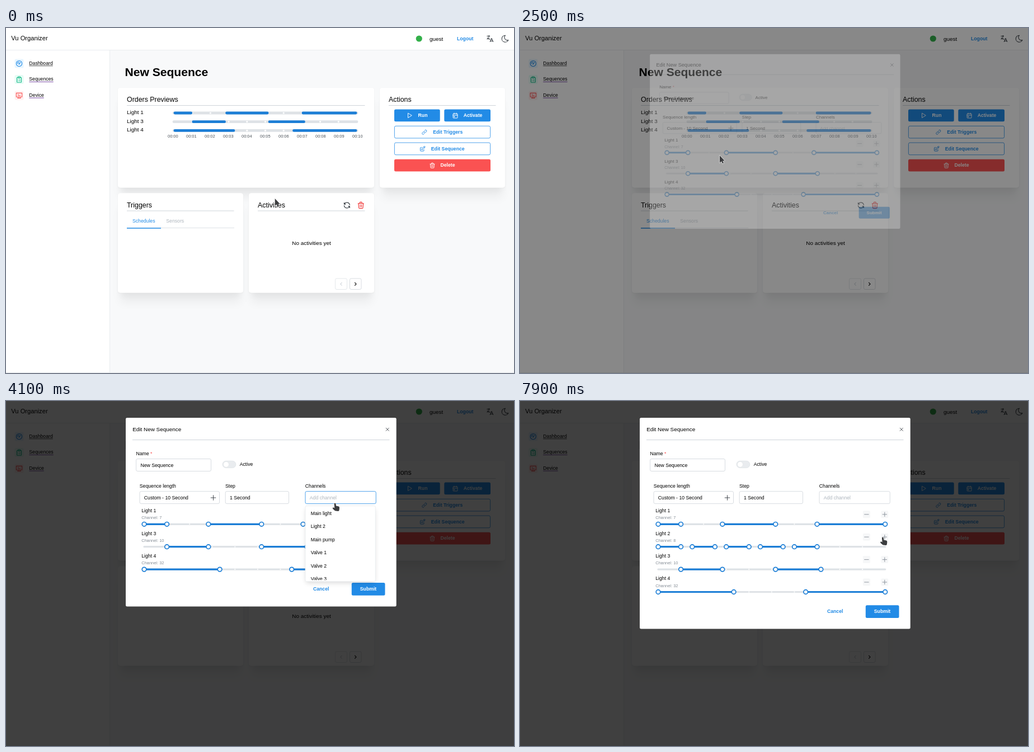
Animation of 908x617 px, one loop 8000 ms. Source, as an HTML page with a canvas:

```html
<!DOCTYPE html>
<html lang="en">
<head>
<meta charset="utf-8">
<title>Sequence editor</title>
<style>
html, body { margin: 0; width: 100%; height: 100%; overflow: hidden; background: #f8f9fa; }
canvas { display: block; }
</style>
</head>
<body>
<canvas id="stage" width="908" height="617"></canvas>
<script>
const W = 908, H = 617, LOOP = 8000;
const stage = document.getElementById('stage').getContext('2d');
const layer = Object.assign(document.createElement('canvas'), { width: W, height: H }).getContext('2d');
let c = stage;

const BLUE = '#228be6', TRACK = '#1c7ed6', RED = '#fa5252', INK = '#000', LINE = '#ced4da', RAIL = '#dee2e6';
const BODY = 9.92, SMALL = 8.68, TINY = 7.44;

const ICONS = {
  play: 'M7 4v16l13-8z',
  calendar: 'M4 7a2 2 0 0 1 2-2h12a2 2 0 0 1 2 2v12a2 2 0 0 1-2 2h-12a2 2 0 0 1-2-2zM16 3v4M8 3v4M4 11h16M8 15h2v2h-2z',
  link: 'M10 14a3.5 3.5 0 0 0 5 0l4-4a3.5 3.5 0 0 0-5-5l-.5.5M14 10a3.5 3.5 0 0 0-5 0l-4 4a3.5 3.5 0 0 0 5 5l.5-.5',
  edit: 'M9 7H6a2 2 0 0 0-2 2v9a2 2 0 0 0 2 2h9a2 2 0 0 0 2-2v-3M9 15h3l8.5-8.5a1.5 1.5 0 0 0-3-3L9 12v3M16 5l3 3',
  trash: 'M4 7h16M10 11v6M14 11v6M5 7l1 12a2 2 0 0 0 2 2h8a2 2 0 0 0 2-2l1-12M9 7v-3a1 1 0 0 1 1-1h4a1 1 0 0 1 1 1v3',
  refresh: 'M20 11a8.1 8.1 0 0 0-15.5-2M4 5v4h4M4 13a8.1 8.1 0 0 0 15.5 2M20 19v-4h-4',
  gauge: 'M3 12a9 9 0 1 0 18 0a9 9 0 1 0-18 0M11 13a1 1 0 1 0 2 0a1 1 0 1 0-2 0M13.4 11.6l2.6-3.6M7 12a5 5 0 0 1 5-5',
  clipboard: 'M9 5H7a2 2 0 0 0-2 2v12a2 2 0 0 0 2 2h10a2 2 0 0 0 2-2V7a2 2 0 0 0-2-2h-2M9 3h6v4h-6zM9 12h.1M13 12h2M9 16h.1M13 16h2',
  desktop: 'M3 4h18v12h-18zM7 20h10M9 16v4M15 16v4M9 12v-4M12 12v-1M15 12v-2',
  language: 'M4 5h7M9 3v2c0 4.4-2.2 8-5 8M5 9c0 2.1 3 3.9 6.7 4M12 20l4-9l4 9M19.1 18h-6.2',
  moon: 'M12 3h.4a7.5 7.5 0 0 0 7.9 12.4a9 9 0 1 1-8.3-12.4z',
  left: 'M15 6l-6 6l6 6',
  right: 'M9 6l6 6l-6 6',
  close: 'M6 6l12 12M18 6l-12 12',
  plus: 'M12 3v18M3 12h18',
  minus: 'M3 12h18'
};
for (const k in ICONS) ICONS[k] = new Path2D(ICONS[k]);

const ARROW = new Path2D('M0 0L0 13L3 10.6L5 14.6L7 13.6L5.2 9.8L8.8 9.4z');
const HAND = new Path2D('M-1.4 .9Q0 -.7 1.4 .9L2 5L6.5 6Q8.3 6.6 8 9L7.5 13Q7 14.5 5.5 14.5L1 14Q-.6 13.8 -4.3 9.4Q-4.3 7.5 -2.5 8L-.8 9z');

// Centre-line text: y is the middle of the capitals.
function text(s, x, y, size = SMALL, color = INK, bold = false, align = 'left') {
  c.font = `${bold ? 'bold ' : ''}${size}px "Liberation Sans", Arial, sans-serif`;
  c.textAlign = align;
  c.fillStyle = color;
  c.fillText(s, x, y + size * 0.36);
}

function box(x0, y0, x1, y1, r, fill, stroke) {
  c.beginPath();
  c.roundRect(x0, y0, x1 - x0, y1 - y0, r);
  if (fill) { c.fillStyle = fill; c.fill(); }
  if (stroke) { c.strokeStyle = stroke; c.lineWidth = 0.8; c.stroke(); }
}

function line(x0, y0, x1, y1, color, width = 1, cap = 'butt') {
  c.beginPath();
  c.moveTo(x0, y0);
  c.lineTo(x1, y1);
  c.strokeStyle = color;
  c.lineWidth = width;
  c.lineCap = cap;
  c.stroke();
}

function disc(x, y, r, fill, stroke, width = 1) {
  c.beginPath();
  c.arc(x, y, r, 0, Math.PI * 2);
  c.fillStyle = fill;
  c.fill();
  if (stroke) { c.strokeStyle = stroke; c.lineWidth = width; c.stroke(); }
}

function icon(name, x, y, scale, color, width = 1.9) {
  c.save();
  c.translate(x - 12 * scale, y - 12 * scale);
  c.scale(scale, scale);
  c.lineWidth = width;
  c.lineCap = c.lineJoin = 'round';
  c.strokeStyle = color;
  c.stroke(ICONS[name]);
  c.restore();
}

function shadow(x0, y0, x1, y1, inset, dy, blur, alpha) {
  c.save();
  c.shadowColor = `rgba(0,0,0,${alpha})`;
  c.shadowOffsetY = dy;
  c.shadowBlur = blur;
  box(x0 + inset, y0 + inset, x1 - inset, y1 - inset, 4, '#fff');
  c.restore();
}

function card(x0, y0, x1, y1, title) {
  shadow(x0, y0, x1, y1, 4.3, 22, 17, 0.05);
  shadow(x0, y0, x1, y1, 4.3, 10.5, 10.5, 0.04);
  shadow(x0, y0, x1, y1, 0, 0.6, 2, 0.07);
  box(x0, y0, x1, y1, 5, '#fff');
  text(title, x0 + 16, y0 + 20.8, 12.4);
  line(x0 + 16, y0 + 31.5, x1 - 16.5, y0 + 31.5, LINE);
}

function button(x0, y0, x1, label, cx, name, ix, color, outline) {
  const fg = outline ? color : '#fff', y1 = y0 + 21.7, cy = y0 + 10.4;
  box(x0, y0, x1, y1, 2.5, outline ? '#fff' : color, outline && color);
  icon(name, ix, cy + 0.6, 0.5, fg);
  text(label, cx, cy, SMALL, fg, true, 'center');
}

const light1 = { name: 'Light 1', channel: 7, on: [[0, 1], [2.83, 5.17], [7, 10]] };
const light3 = { name: 'Light 3', channel: 10, on: [[1, 2.83], [5.17, 7.17]] };
const light4 = { name: 'Light 4', channel: 32, on: [[0, 3.33], [6.5, 10]] };

function slider(row, x0, step, y, width) {
  const at = v => x0 + step * v;
  line(x0, y, at(10), y, RAIL, width, 'round');
  for (let i = 1; i < 10; i++) disc(at(i), y, width * 0.33, '#fff');
  for (const [a, b] of row.on) line(at(a) + 2, y, at(b) - 2, y, TRACK, width, 'round');
}

function navItem(label, y, name, color, tint, under) {
  box(15.5, y - 7.2, 31.5, y + 8.8, 2.5, tint);
  icon(name, 23.5, y + 0.9, 0.57, color);
  text(label, 41.3, y);
  line(41.3, y + 5, 41.3 + c.measureText(label).width, y + 5, under, 0.8);
}

function page() {
  c.fillStyle = '#f8f9fa';
  c.fillRect(0, 0, W, H);
  c.fillStyle = '#fff';
  c.fillRect(0, 0, W, 39);
  c.fillRect(0, 39, 185, H);
  line(0, 39.5, W, 39.5, '#e9ecef');
  line(185.5, 40, 185.5, H, '#e9ecef');
  line(0, 616.5, W, 616.5, '#e4e7ea');

  text('Vu Organizer', 9.3, 18.4, 11.16);
  disc(738.3, 19, 5.6, '#33b04a');
  text('guest', 757, 19, BODY);
  text('Logout', 806, 18.5, SMALL, BLUE, true);
  icon('language', 865.3, 19.2, 0.67, '#343a40', 1.6);
  icon('moon', 892.3, 19.2, 0.67, '#343a40', 1.6);

  navItem('Dashboard', 62.7, 'gauge', BLUE, '#e7f5ff', '#222');
  navItem('Sequences', 91.3, 'clipboard', '#12b886', '#e6fcf5', '#551a8b');
  navItem('Device', 120, 'desktop', RED, '#fff0f0', '#551a8b');

  text('New Sequence', 212.5, 78.6, 21.08, INK, true);

  card(200, 107, 658, 285.5, 'Orders Previews');
  [light1, light3, light4].forEach((row, i) => {
    text(row.name, 216, 150.5 + 15.6 * i, BODY);
    slider(row, 300, 32.7, 152 + 15.7 * i, 4.8);
  });
  for (let i = 0; i <= 10; i++)
    text('00:' + String(i).padStart(2, '0'), 298.3 + 33 * i, 193, TINY, '#495057', false, 'center');

  card(668, 107, 892, 285.5, 'Actions');
  button(694, 145.6, 775.7, 'Run', 745, 'play', 721, BLUE);
  button(783.3, 145.6, 866, 'Activate', 834.5, 'calendar', 803, BLUE);
  button(694.4, 175.3, 865.6, 'Edit Triggers', 789.7, 'link', 747.8, BLUE, true);
  button(694.4, 205.1, 865.6, 'Edit Sequence', 789.7, 'edit', 744.5, BLUE, true);
  button(694, 234.8, 866, 'Delete', 789.5, 'trash', 762, RED);

  card(200, 295.5, 424, 473.5, 'Triggers');
  text('Schedules', 226, 344.8, SMALL, BLUE);
  text('Sensors', 286.3, 344.8, SMALL, '#adb5bd');
  line(216, 357.5, 408, 357.5, RAIL);
  line(216, 358, 277, 358, BLUE, 1.3);

  card(434, 295.5, 658, 473.5, 'Activities');
  icon('refresh', 609.4, 317, 0.62, '#343a40', 1.9);
  icon('trash', 634.3, 317, 0.62, '#f03e3e', 1.9);
  text('No activities yet', 546, 384, BODY, INK, false, 'center');
  box(588.5, 448, 609.5, 467.5, 2.5, '#fff', '#dee2e6');
  icon('left', 599, 457.8, 0.42, '#ced4da', 2.4);
  box(614.5, 448, 635, 467.5, 2.5, '#fff', LINE);
  icon('right', 624.8, 457.8, 0.42, INK, 2.6);
}

function field(label, x0, x1, y, value, color = INK, border = LINE) {
  text(label, x0, y - 21);
  box(x0 + 0.2, y - 11, x1, y + 11, 2.5, '#fff', border);
  text(value, x0 + 8, y, SMALL, color);
}

function channelRow(row, i) {
  const y = 40.4 * i;
  text(row.name, 242.3, 196 + y);
  text('Channel: ' + row.channel, 242.3, 208.7 + y, TINY, '#868e96');
  for (const [name, x] of [['minus', 619.4], ['plus', 651.8]]) {
    box(x - 6.5, 196.3 + y, x + 6.5, 209.3 + y, 2, '#f6f7f8');
    icon(name, x, 202.8 + y, 0.42, '#868e96', 2.2);
  }
  slider(row, 247, 40.57, 220.3 + y, 3.2);
  for (const v of row.on.flat()) disc(247 + 40.57 * v, 220.3 + y, 3.8, '#fff', TRACK, 1.7);
}

function dialog(t) {
  const rows = [light1, light3, light4];
  if (t >= ADDED) {
    const count = 1 + CLICKS.filter(k => t >= k).length;
    const on = Array.from({ length: count }, (_, i) => [1.5 * i, 1.5 * i + 1]);
    rows.splice(1, 0, { name: 'Light 2', channel: 8, on });
  }
  const grow = 40.2 * (rows.length - 3);
  const focus = t >= PICK && t < CLICKS[0];

  box(214, 30, 697.7, 367.4 + grow, 2.5, '#fff');
  text('Edit New Sequence', 226.2, 50, BODY);
  line(226, 69.5, 685.5, 69.5, LINE);
  icon('close', 681.8, 50.8, 0.43, '#343a40', 2);

  field('Name', 232.4, 366.5, 114.5, 'New Sequence');
  text('*', 258, 93.5, SMALL, RED);
  box(387, 107.2, 410.8, 119.6, 6.2, '#e9ecef', RAIL);
  disc(393.5, 113.4, 5, '#fff', RAIL, 0.7);
  text('Active', 417.7, 113);

  field('Sequence length', 238.8, 381.5, 172.6, 'Custom - 10 Second');
  icon('plus', 370.5, 173, 0.48, '#343a40', 1.9);
  field('Step', 392, 505.5, 172.6, '1 Second');
  field('Channels', 534.8, 661.3, 172.6, 'Add channel', '#adb5bd', focus ? BLUE : LINE);

  rows.forEach(channelRow);
  text('Cancel', 563.2, 336 + grow, SMALL, BLUE, true, 'center');
  box(617.8, 325 + grow, 677.5, 347.8 + grow, 2.5, BLUE);
  text('Submit', 647.5, 336 + grow, SMALL, '#fff', true, 'center');

  if (t >= PICK && t < ADDED) dropdown();
}

function dropdown() {
  shadow(535, 187.5, 660.3, 322.8, 1, 4, 9, 0.14);
  box(535, 187.5, 660.3, 322.8, 2.5, '#fff', '#e9ecef');
  c.save();
  c.beginPath();
  c.rect(535, 188, 125, 132.3);
  c.clip();
  ['Main light', 'Light 2', 'Main pump', 'Valve 1', 'Valve 2', 'Valve 3']
    .forEach((s, i) => text(s, 544.8, 200.7 + 23.5 * i));
  c.restore();
}

// Timeline
const OPEN = 2455, PICK = 4000, ADDED = 5300, CLICKS = [6900, 7100, 7300, 7500];

// The picture moves in 100 ms steps inside these spans and rests between them.
const SPANS = [[0, 100], [400, 600], [1000, 1200], [1400, 1800], [2200, 2600], [2900, 3500],
  [3800, 5100], [5300, 5300], [5600, 5600], [5800, 6600], [6800, 7600], [7900, 7900]];

function snap(t) {
  const step = Math.floor(t / 100) * 100;
  let at = 0;
  for (const [a, b] of SPANS) if (step >= a) at = Math.min(step, b);
  return at;
}

// Pointer stops: time, x, y
const PATH = [
  [0, 480.7, 305], [100, 485, 302], [400, 512, 288], [500, 572, 256], [600, 614, 238],
  [1000, 624, 237], [1200, 663.5, 230], [1400, 690, 225], [1600, 762, 216], [1800, 792, 213],
  [2200, 705, 215], [2300, 570, 220], [2400, 450, 225.5], [2500, 357, 228], [2600, 327, 231.5],
  [2900, 335, 300], [3100, 390, 368], [3300, 490, 335], [3500, 578, 245],
  [3800, 582, 212], [4000, 588, 183], [4100, 588, 182.5], [4300, 596, 215], [4600, 610, 270],
  [4700, 612, 286], [4900, 590, 258], [5100, 559.5, 227], [5300, 559.5, 227],
  [5600, 412, 238], [5800, 310, 256], [6000, 259, 275], [6200, 400, 264], [6400, 590, 249],
  [6600, 654.3, 244.5], [7600, 654.3, 244.5], [7900, 648.3, 243.5]
];
const HANDS = [[1500, 2200], [3900, 5400], [6500, LOOP]];

function pointer(t) {
  let i = 0;
  while (i < PATH.length - 2 && PATH[i + 1][0] <= t) i++;
  const [t0, x0, y0] = PATH[i], [t1, x1, y1] = PATH[i + 1];
  const k = Math.min(1, (t - t0) / (t1 - t0));
  const shape = HANDS.some(([a, b]) => t >= a && t < b) ? HAND : ARROW;
  c.save();
  c.translate(x0 + (x1 - x0) * k, y0 + (y1 - y0) * k);
  c.lineJoin = 'round';
  c.lineWidth = 1.3;
  c.strokeStyle = 'rgba(255,255,255,.75)';
  c.stroke(shape);
  c.fillStyle = '#3c3d3f';
  c.fill(shape);
  c.restore();
}

// CSS "ease": cubic-bezier(.25, .1, .25, 1)
function ease(x) {
  if (x <= 0 || x >= 1) return x <= 0 ? 0 : 1;
  const bez = (u, a, b) => 3 * u * (1 - u) * (1 - u) * a + 3 * u * u * (1 - u) * b + u * u * u;
  let lo = 0, hi = 1;
  for (let i = 0; i < 24; i++) {
    const mid = (lo + hi) / 2;
    if (bez(mid, 0.25, 0.25) < x) lo = mid; else hi = mid;
  }
  return bez(lo, 0.1, 1);
}

function modal(t) {
  const p = ease((t - OPEN) / 250), s = 0.9 + 0.1 * p;
  stage.fillStyle = `rgba(0,0,0,${0.75 * ease((t - OPEN) / 125)})`;
  stage.fillRect(0, 0, W, H);

  c = layer;
  c.setTransform(1, 0, 0, 1, 0, 0);
  c.clearRect(0, 0, W, H);
  c.translate(455.85, 198.7 + 5.6 * (1 - p));
  c.scale(s, s);
  c.translate(-455.85, -198.7);
  dialog(t);
  c = stage;

  c.globalAlpha = p;
  c.drawImage(layer.canvas, 0, 0);
  c.globalAlpha = 1;
}

const start = performance.now();
let shown = -1;
function frame() {
  const t = snap((performance.now() - start) % LOOP);
  if (t !== shown) {
    shown = t;
    page();
    if (t > OPEN) modal(t);
    pointer(t);
  }
  requestAnimationFrame(frame);
}
frame();
</script>
</body>
</html>
```
